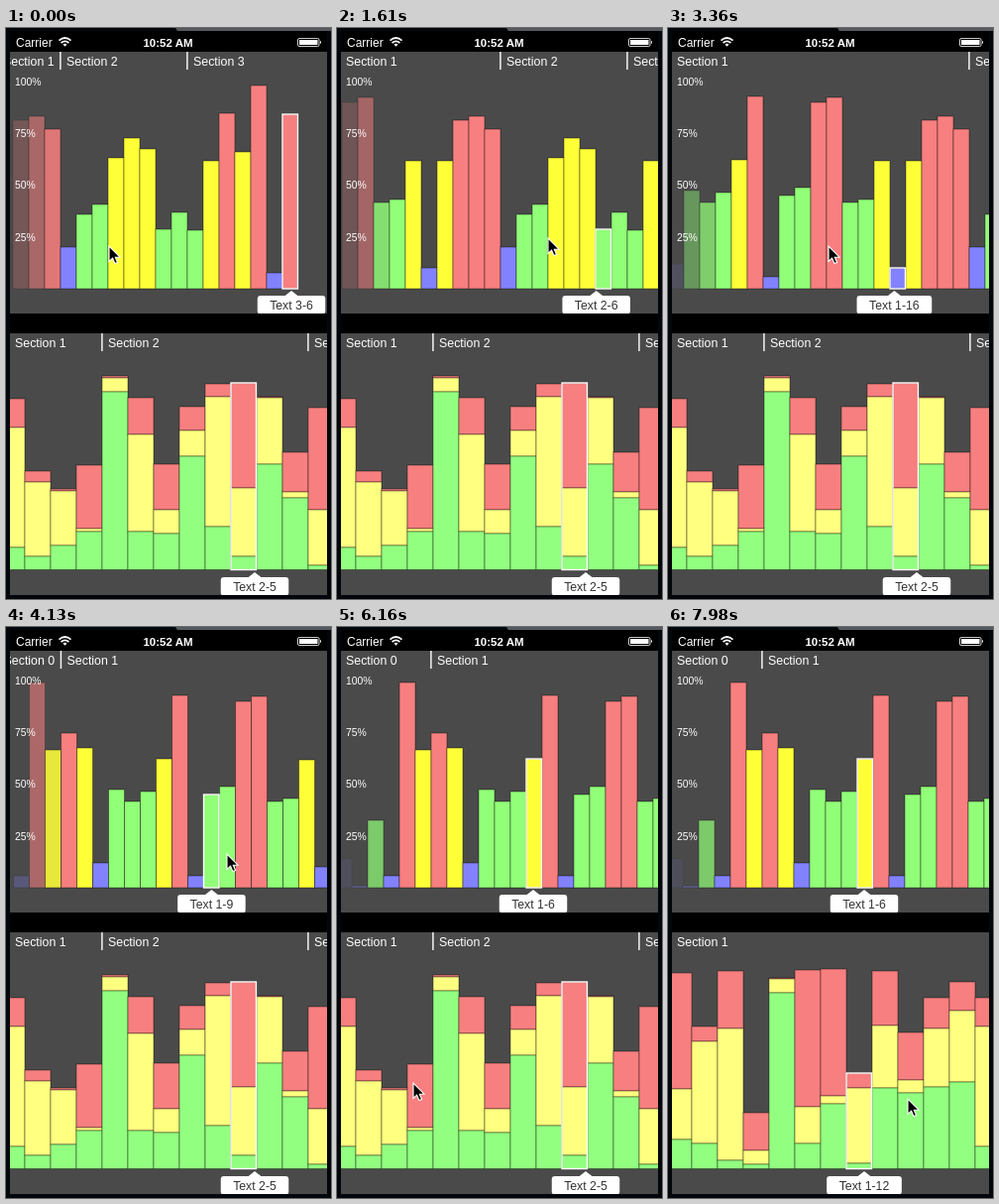
Write an HTML page that moves like this. It is 328x576 px and loops after 8 s.

```html
<!DOCTYPE html>
<html lang="en">
<head>
<meta charset="utf-8">
<title>Scrolling bar charts</title>
<style>
html, body { margin: 0; width: 100%; height: 100%; overflow: hidden; background: #03070c; }
svg { display: block; width: 328px; height: 576px; }
text { font-family: "Liberation Sans", Arial, sans-serif; font-size: 12.4px; fill: #fff; }
.axis text { font-size: 10.4px; }
.bubble text { fill: #333; font-size: 12.3px; text-anchor: middle; }
</style>
</head>
<body>
<svg viewBox="0 0 328 576">
  <defs>
    <clipPath id="topClip"><rect x="4" y="24" width="320" height="264"/></clipPath>
    <clipPath id="lowClip"><rect x="4" y="308" width="320" height="264"/></clipPath>
  </defs>
  <rect width="328" height="576" fill="#03070c"/>
  <path d="M171 0H328V3H173Z" fill="#555a60"/>
  <rect x="4" y="3" width="320" height="569" fill="#000"/>
  <text x="10" y="18.500" style="font-size:12px">Carrier</text>
  <g fill="none" stroke="#fff" stroke-width="1.700">
    <path d="M53.500 12.600Q59.500 7.400 65.500 12.600M55.600 15Q59.500 11.600 63.400 15"/>
    <path d="M57.500 16.500Q59.500 14.800 61.500 16.500L59.500 18.800Z" fill="#fff" stroke="none"/>
  </g>
  <text x="163.500" y="18.500" text-anchor="middle" style="font-size:11.500px;font-weight:bold">10:52 AM</text>
  <rect x="294.500" y="10.500" width="21.500" height="8" rx="1.500" fill="none" stroke="#fff" stroke-width=".8"/>
  <rect x="296" y="12" width="18.500" height="5" fill="#fff"/>
  <path d="M317 12.800Q319 14.500 317 16.200Z" fill="#fff"/>
  <g id="top" clip-path="url(#topClip)"></g>
  <g id="low" clip-path="url(#lowClip)"></g>
  <path id="cursor" d="M0 0V15.500L3.600 12.200L6 17.600L8.600 16.500L6.300 11.200H11Z" fill="#000" stroke="#fff" stroke-width="1.100"/>
</svg>
<script>
const LOOP = 8000, STEP = 70;
const RED = '#f77f7f', YELLOW = '#ffff38', GREEN = '#92ff78', BLUE = '#8282ff';
const STACK = [RED, '#ffff80', '#92ff80'];
const SECTIONS = [-40, 0, 21, 29, 99]; // first bar of each section

// Bar heights of the upper chart, starting at bar -6
const levels = [29, 2, 68, 12, 207, 139, 156, 141, 25, 99, 87, 97, 130, 194, 12, 94, 102, 188,
  193, 87, 90, 129, 21, 129, 170, 174, 161, 42, 75, 85, 132, 152, 141, 60, 77, 59, 129, 177,
  138, 205, 16, 176];

// Stacked tops (red, yellow, green) of the lower chart, starting at bar 5
const stacks = [[349, 466, 517], [403, 418, 521], [347, 405, 538], [490, 528, 542], [354, 355, 369],
  [346, 484, 521], [345, 473, 481], [450, 465, 541], [347, 402, 465], [409, 457, 470],
  [374, 405, 464], [358, 387, 459], [374, 403, 524], [447, 458, 533], [465, 467, 522],
  [441, 505, 508], [351, 353, 367], [373, 410, 508], [440, 486, 510], [382, 406, 432],
  [359, 372, 503], [358, 464, 533], [372, 373, 440], [428, 468, 474], [383, 486, 542]];

// Keys: [time, value...]
const topScroll = [[70, -281], [1610, -171], [1900, -149], [2300, -149], [3360, -32], [3900, 30], [4350, 80], [4700, 95]];
const lowScroll = [[6160, -449], [6700, -345], [7070, -279], [7600, -185], [7980, -132]];
const pointer = [[70, 104, 220], [1610, 213, 212], [1900, 235, 213], [2300, 45, 221], [3360, 162, 220],
  [3900, 223, 229], [4900, 223, 229], [5900, 77, 460], [6160, 77, 460], [6800, 163, 470],
  [7070, 163, 470], [7700, 242, 476]];

function at(keys, t, col = 1) {
  const i = keys.findIndex(k => k[0] > t);
  if (i === 0) return keys[0][col];
  if (i < 0) return keys[keys.length - 1][col];
  const a = keys[i - 1], b = keys[i];
  return a[col] + (b[col] - a[col]) * (t - a[0]) / (b[0] - a[0]);
}

const rect = (x, y, w, h, attrs) => `<rect x="${x}" y="${y}" width="${w}" height="${h}" ${attrs}/>`;
const label = (x, y, s) => `<text x="${x}" y="${y}">${s}</text>`;
const edge = 'stroke="#000" stroke-opacity=".4" stroke-width="1"';
const clamp = v => Math.max(0, Math.min(1, v));

function levelBar(i, x) {
  const h = levels[i + 6];
  if (h === undefined) return '';
  const color = [BLUE, GREEN, YELLOW, RED][Math.min(3, Math.floor(h / 52))];
  return rect(x, 263 - h, 16, h, `fill="${color}" ${edge} opacity="${clamp((x + 6) / 52)}"`);
}

function stackBar(i, x) {
  const tops = stacks[i - 5];
  if (!tops) return '';
  return tops.map((y, k) =>
    rect(x, y, 26, (tops[k + 1] || 546.5) - y, `fill="${STACK[k]}" ${edge}`)).join('');
}

function sections(scroll, barWidth, y) {
  let out = '';
  for (let n = 0; n < 4; n++) {
    const x = scroll + SECTIONS[n] * barWidth, next = scroll + SECTIONS[n + 1] * barWidth;
    if (x > 324 || next < 0) continue;
    out += rect(x - .8, y, 1.4, 18, 'fill="#fff"');
    out += label(Math.min(Math.max(9, x + 6), next - 58), y + 14, 'Section ' + n);
  }
  return out;
}

function bubble(x, y, text) {
  const w = 68.5 + (text.length - 8) * 7.2;
  return `<g class="bubble">${rect(x - w / 2, y + 246, w, 18.5, 'rx="3" fill="#fff"')}
    <path d="M${x - 7} ${y + 246.5}L${x} ${y + 241}L${x + 7} ${y + 246.5}Z" fill="#fff"/>
    ${label(x, y + 259.7, text)}</g>`;
}

function chart(y, barWidth, scroll, marker, bar, topOf, base, axis) {
  const first = Math.floor(-scroll / barWidth), last = Math.ceil((324 - scroll) / barWidth);
  let out = rect(4, y, 320, 264, 'fill="#4a4a4a"');
  for (let i = first; i <= last; i++) out += bar(i, scroll + i * barWidth);
  const picked = Math.floor((marker - scroll) / barWidth);
  const n = SECTIONS.findLastIndex(s => s <= picked);
  const top = topOf(picked);
  out += rect(scroll + picked * barWidth, top, barWidth - .5, base - top,
    'fill="none" stroke="#fff" stroke-width="1.400"');
  return out + axis + sections(scroll, barWidth, y) +
    bubble(marker, y, `Text ${n}-${picked - SECTIONS[n]}`);
}

const axis = `<g class="axis">${[100, 75, 50, 25].map((v, i) => label(9, 58 + i * 52.2, v + '%')).join('')}</g>`;
const [topChart, lowChart, cursor] = ['top', 'low', 'cursor'].map(id => document.getElementById(id));

function draw(t) {
  const a = at(topScroll, t), b = at(lowScroll, t);
  topChart.innerHTML = chart(24, 16, a, 198 + .2394 * (95 - a), levelBar, i => 263 - levels[i + 6], 263, axis);
  lowChart.innerHTML = chart(308, 26, b, 198 + .1672 * (-132 - b), stackBar, i => stacks[i - 5][0], 546.5, '');
  cursor.setAttribute('transform', `translate(${at(pointer, t)} ${at(pointer, t, 2)})`);
}

const start = performance.now();
let shown = -1;
function tick() {
  const t = Math.floor((performance.now() - start) % LOOP / STEP) * STEP;
  if (t !== shown) draw(shown = t);
  requestAnimationFrame(tick);
}
tick();
</script>
</body>
</html>
```
